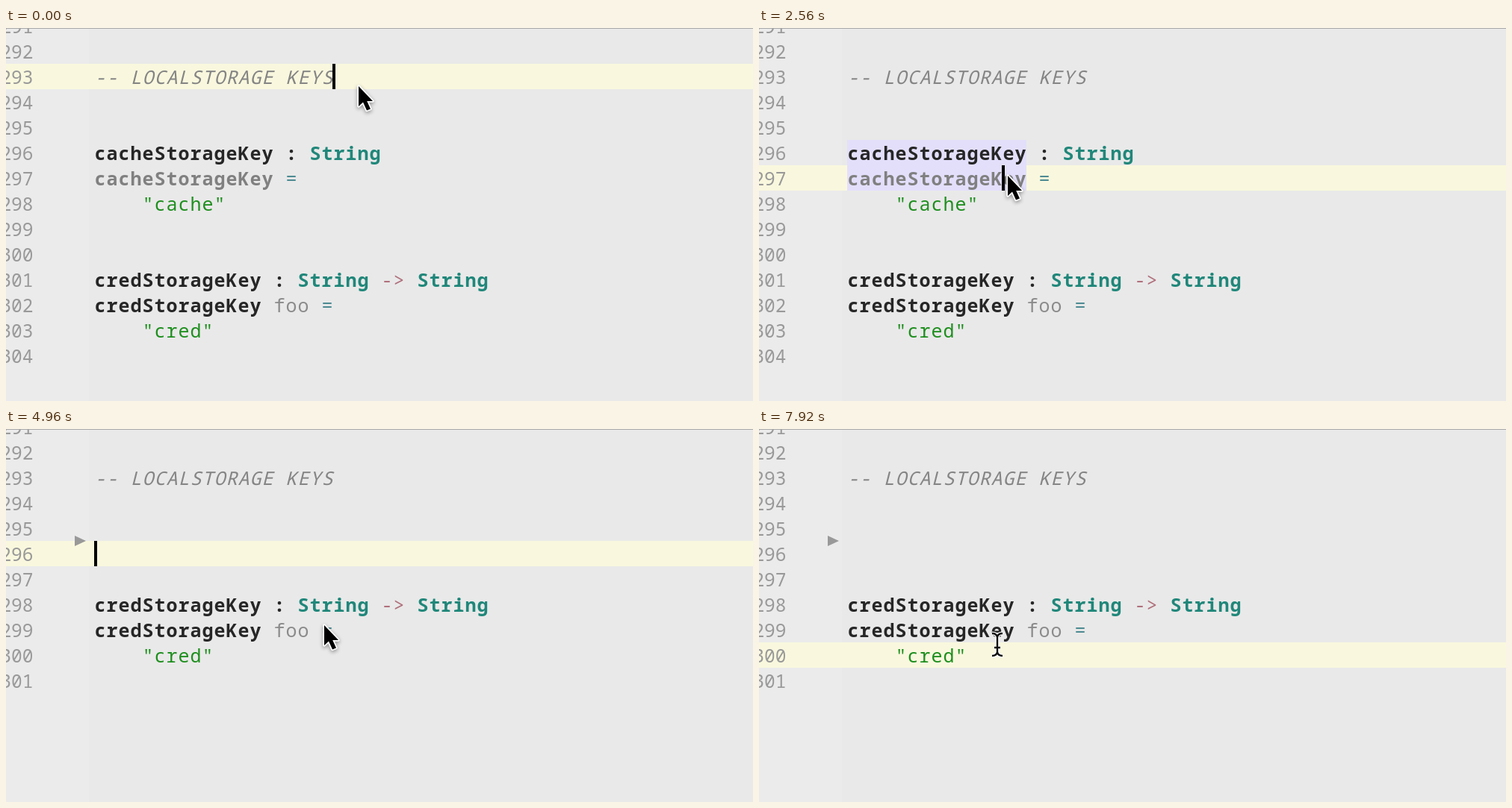
An HTML page with a canvas for the animation above (8000 ms loop, 1000 px wide and 500 px high).

```html
<!DOCTYPE html>
<html lang="en">
<head>
<meta charset="utf-8">
<title>Unused declarations</title>
<style>
html, body { margin: 0; width: 100%; height: 100%; overflow: hidden; background: #e9e9e9; }
canvas { display: block; width: 1000px; height: 500px; }
</style>
</head>
<body>
<canvas id="stage" width="1000" height="500"></canvas>
<script>
const ctx = document.getElementById('stage').getContext('2d');
const LOOP = 8000, STEP = 80, LEFT = 118, CELL = 16, ROW = 34;
const MONO = '"Noto Sans Mono", "DejaVu Sans Mono", monospace';
const SANS = 'Inter, Roboto, sans-serif';
const CODE_SIZE = 25, NUMBER_SIZE = 24.5;

// Event times in ms
const HINT1 = 800, CLICK1 = 2320, TYPING = 2720, DELETE = 3920;
const MOUSE_BACK = 4480, HINT2 = 5120, CLICK2 = 7360;

const C = {
  name: '#262626', unused: '#808080', type: '#20877a', string: '#1f8f1f',
  op: '#4d8a92', arrow: '#b0707c', param: '#8b8b8b', comment: '#858585',
  number: '#999', band: '#f9f8de', match: '#e3dffb', select: '#5671ab'
};

// Tracking that puts each code character in one cell
ctx.font = `${CODE_SIZE}px ${MONO}`;
const tracking = CELL - ctx.measureText('0').width;

const rowTop = n => 14 + ROW * (n - 292);
const colX = c => LEFT + CELL * c;

function rect(x, y, w, h, color) {
  ctx.fillStyle = color;
  ctx.fillRect(x, y, w, h);
}

function text(s, x, y, font, color) {
  ctx.font = font;
  ctx.fillStyle = color;
  ctx.fillText(s, x, y);
}

function code(row, col, s, color, style = '') {
  ctx.letterSpacing = `${tracking}px`;
  text(s, colX(col) + tracking / 2, rowTop(row) + 27, `${style} ${CODE_SIZE}px ${MONO}`, color);
  ctx.letterSpacing = '0px';
}

function cacheCode(white) {
  const c = k => white || C[k];
  code(296, 0, 'cacheStorageKey', c('name'), 'bold');
  code(296, 16, ':', c('name'), 'bold');
  code(296, 18, 'String', c('type'), 'bold');
  code(297, 0, 'cacheStorageKey', c('unused'), 'bold');
  code(297, 16, '=', c('op'));
  code(298, 4, '"cache"', c('string'));
}

function credCode(row) {
  code(row, 0, 'credStorageKey', C.name, 'bold');
  code(row, 15, ':', C.name, 'bold');
  code(row, 17, 'String', C.type, 'bold');
  code(row, 24, '->', C.arrow);
  code(row, 27, 'String', C.type, 'bold');
  code(row + 1, 0, 'credStorageKey', C.name, 'bold');
  code(row + 1, 15, 'foo', C.param);
  code(row + 1, 19, '=', C.op);
  code(row + 2, 4, '"cred"', C.string);
}

function selection(t) {
  if (t < 2880 || t >= DELETE) return [];
  if (t < 3040) return [[LEFT, rowTop(297), 15 * CELL, ROW]];
  if (t < 3280) return [[LEFT, rowTop(297), 882, ROW], [LEFT, rowTop(298), 11 * CELL, ROW]];
  return [[LEFT, rowTop(296), 882, 3 * ROW]];
}

function caretAt(t) {
  if (t < CLICK1) return { row: 293, col: 20, since: -400 };
  if (t < DELETE) return { row: 297, col: 13, since: t < TYPING ? CLICK1 : t };
  if (t < CLICK2) return { row: 296, col: 0, since: DELETE };
  return { row: 300, col: 10, since: CLICK2 };
}

function editor(t) {
  const deleted = t >= DELETE, caret = caretAt(t), sel = selection(t);
  rect(0, 0, 1000, 500, '#e9e9e9');
  rect(0, 0, 111, 500, '#ebebeb');
  rect(0, rowTop(caret.row), 1000, ROW, C.band);
  if (t >= CLICK1 && t < 2880) rect(LEFT, rowTop(296), 15 * CELL, 2 * ROW, C.match);

  ctx.textAlign = 'right';
  for (let n = 291; n <= (deleted ? 301 : 304); n++)
    text(n, 36.5, rowTop(n) + 27, `${NUMBER_SIZE}px ${MONO}`, C.number);
  ctx.textAlign = 'left';

  code(293, 0, '-- LOCALSTORAGE KEYS', C.comment, 'italic');
  if (!deleted) cacheCode();
  credCode(deleted ? 298 : 301);

  if (sel.length) {
    ctx.save();
    ctx.beginPath();
    sel.forEach(r => ctx.rect(...r));
    ctx.clip();
    rect(0, 0, 1000, 500, C.select);
    cacheCode('#fff');
    ctx.restore();
  }
  if (deleted) {
    ctx.fillStyle = '#999';
    ctx.fill(new Path2D('M92 143L107 150L92 157Z'));
  }
  if ((t - caret.since) % 1000 < 500)
    rect(colX(caret.col) - (caret.col ? 1 : 0), rowTop(caret.row), 4, ROW, '#000');
  rect(0, 0, 1000, 1, '#a8a8a8');
}

function hint(t, from, to, x, y, w, message, linkX) {
  const alpha = Math.min(1, (t - from + STEP) / 240, (to + 160 - t) / 160);
  if (t < from || alpha <= 0) return;
  const mid = x + w / 2, h = 62, r = 5;
  ctx.save();
  ctx.globalAlpha = alpha;
  ctx.beginPath();
  ctx.moveTo(mid, y - 19);
  ctx.lineTo(mid + 15, y);
  ctx.arcTo(x + w, y, x + w, y + h, r);
  ctx.arcTo(x + w, y + h, x, y + h, r);
  ctx.arcTo(x, y + h, x, y, r);
  ctx.arcTo(x, y, x + w, y, r);
  ctx.lineTo(mid - 15, y);
  ctx.closePath();
  ctx.save();
  ctx.shadowColor = 'rgba(0,0,0,.45)';
  ctx.shadowBlur = 10;
  ctx.shadowOffsetY = 4;
  ctx.fillStyle = '#f6f6f6';
  ctx.fill();
  ctx.restore();
  ctx.strokeStyle = '#999';
  ctx.lineWidth = 2;
  ctx.stroke();
  const font = `500 25.3px ${SANS}`, base = y + 37;
  text(message, x + 15, base, font, '#1c1c1c');
  text('more...', linkX, base, font, '#2b72b0');
  text('(⌘F1)', linkX + 95, base, font, '#1c1c1c');
  ctx.restore();
}

// Pointer path: time, x, y
const path = [
  [0, 472, 78], [80, 472, 78], [560, 331, 199], [2160, 331, 199], [2560, 333, 198],
  [4480, 333, 198], [4800, 440, 260], [4960, 426, 263], [5040, 396, 267],
  [6320, 396, 267], [6880, 313, 301], [7120, 313, 301], [7360, 319, 289]
];

function pointerAt(t) {
  const i = path.findIndex(p => p[0] > t);
  if (i < 0) return path[path.length - 1].slice(1);
  const [t0, x0, y0] = path[i - 1], [t1, x1, y1] = path[i];
  const k = (t - t0) / (t1 - t0), e = k * k * (3 - 2 * k);
  return [x0 + (x1 - x0) * e, y0 + (y1 - y0) * e];
}

const arrowShape = new Path2D('M0 0V27L6 21.5L11 32.5L16 30.5L11.2 20H19Z');
const beamShape = new Path2D('M-7-15Q-1-15 0-10Q1-15 7-15M0-11V11M-4 4H4M-7 15Q-1 15 0 10Q1 15 7 15');

function pointer(t) {
  if (t >= TYPING && t < MOUSE_BACK) return;
  const [x, y] = pointerAt(t);
  ctx.save();
  ctx.translate(x, y);
  ctx.lineJoin = 'round';
  ctx.strokeStyle = '#fff';
  if (t >= CLICK2) {
    ctx.lineWidth = 5;
    ctx.stroke(beamShape);
    ctx.strokeStyle = '#111';
    ctx.lineWidth = 2.4;
    ctx.stroke(beamShape);
  } else {
    ctx.save();
    ctx.shadowColor = 'rgba(0,0,0,.4)';
    ctx.shadowBlur = 5;
    ctx.shadowOffsetY = 2;
    ctx.lineWidth = 3.5;
    ctx.stroke(arrowShape);
    ctx.restore();
    ctx.fillStyle = '#000';
    ctx.fill(arrowShape);
  }
  ctx.restore();
}

function ring(t, click) {
  if (t < click - 240 || t >= click) return;
  const [x, y] = pointerAt(t);
  ctx.beginPath();
  ctx.arc(x, y + 2, 43, 0, 2 * Math.PI);
  ctx.strokeStyle = '#000';
  ctx.lineWidth = 2.6;
  ctx.stroke();
}

function draw(t) {
  editor(t);
  hint(t, HINT1, CLICK1, 37, 235, 610, "'cacheStorageKey' is never used", 458);
  hint(t, HINT2, CLICK2, 186, 303, 438, "'foo' is never used", 436);
  pointer(t);
  ring(t, CLICK1);
  ring(t, CLICK2);
}

function tick() {
  draw(Math.floor(performance.now() % LOOP / STEP) * STEP);
  requestAnimationFrame(tick);
}
tick();
</script>
</body>
</html>
```
